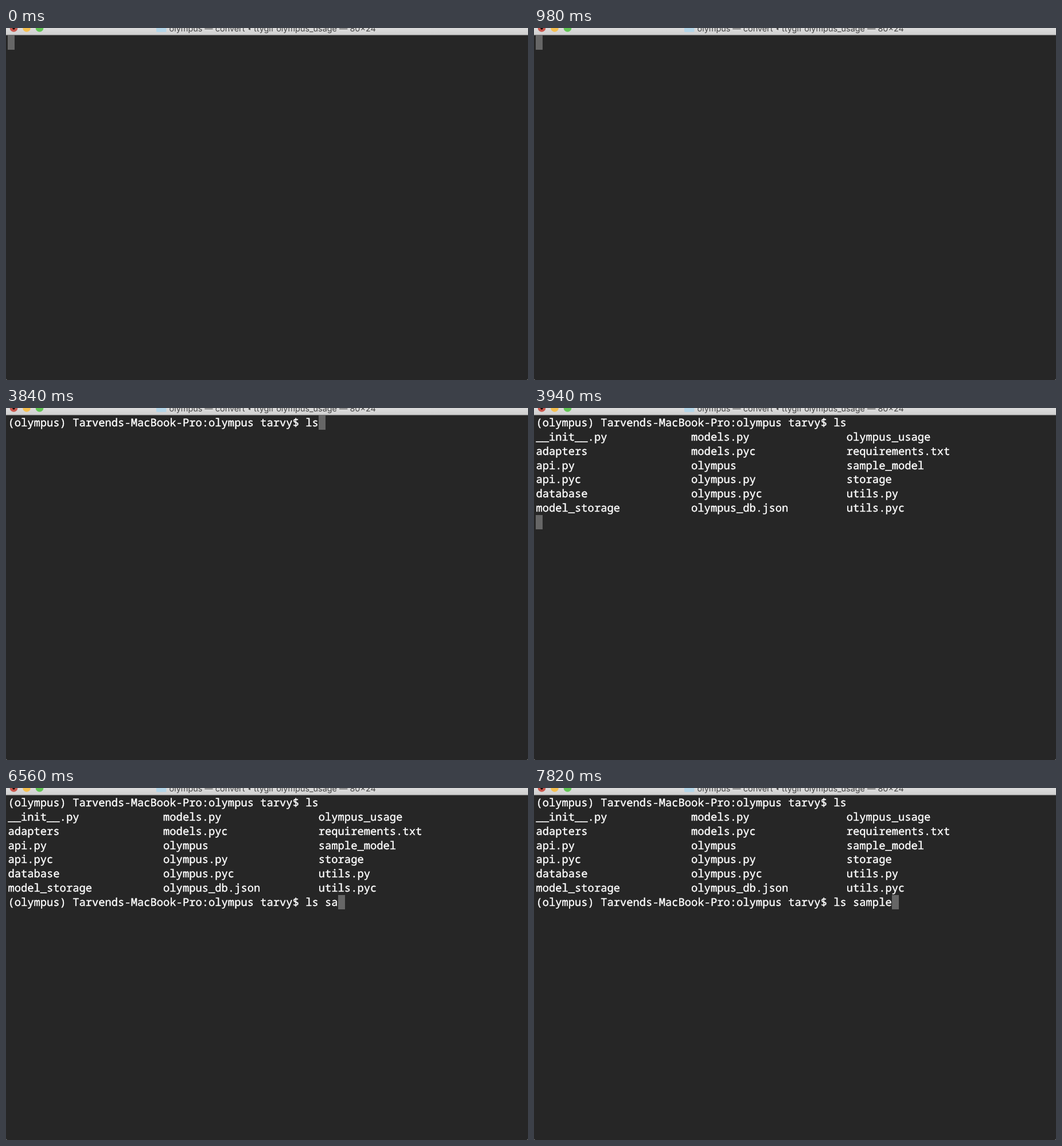
Animation, 910 px wide and 615 px high, one loop 8 s. Source, as an HTML page:

```html
<!DOCTYPE html>
<html lang="en">
<head>
<meta charset="utf-8">
<style>
html, body { margin: 0; width: 100%; height: 100%; overflow: hidden; background: #8a8a8a; }
#window { position: absolute; width: 910px; height: 615px; overflow: hidden; background: #262626; border-radius: 0 0 3px 3px; }
svg { position: absolute; left: 0; top: 0; }
svg text { font: 14.4px Inter, sans-serif; fill: #444; text-rendering: geometricPrecision; }
#screen {
  position: absolute; left: 3.4px; top: 13px; margin: 0; color: #fff;
  font: 18.81px/24.86px "Noto Sans Mono", monospace;
  -webkit-text-stroke: 0.4px #fff;
  text-rendering: geometricPrecision; font-variant-ligatures: none;
}
#cursor { position: absolute; width: 12px; height: 25px; background: #666; }
</style>
</head>
<body>
<div id="window">
  <svg width="910" height="14">
    <defs>
      <linearGradient id="bar" x2="0" y2="1">
        <stop stop-color="#dcdcdc"/><stop offset="1" stop-color="#d0d0d0"/>
      </linearGradient>
    </defs>
    <rect width="910" height="12" fill="url(#bar)"/>
    <rect y="11" width="910" height="1" fill="#c4c4c4"/>
    <rect y="12" width="910" height="1" fill="#6c6c6c"/>
    <circle cx="13.5" cy="0" r="6.8" fill="#c9574d"/>
    <circle cx="13.5" cy="0.5" r="2.2" fill="#200a08"/>
    <circle cx="36" cy="0" r="6.8" fill="#f5bf4f"/>
    <circle cx="58.5" cy="0" r="6.8" fill="#61c554"/>
    <rect x="262" y="-5" width="17.5" height="12" rx="1" fill="#b4d5e8"/>
    <text x="284.5" y="6">olympus — convert</text>
    <path d="M422 1.5l4-2.5v5z" fill="#444"/>
    <text x="432" y="6">ttygif olympus_usage — 80×24</text>
  </svg>
  <div id="cursor"></div>
  <pre id="screen"></pre>
</div>
<script>
const LOOP = 8000, CELL = 11.29, ROW = 24.86;
const PROMPT = "(olympus) Tarvends-MacBook-Pro:olympus tarvy$ ";
const CLEAR = "\f";
const listing = [
  ["__init__.py", "models.py", "olympus_usage"],
  ["adapters", "models.pyc", "requirements.txt"],
  ["api.py", "olympus", "sample_model"],
  ["api.pyc", "olympus.py", "storage"],
  ["database", "olympus.pyc", "utils.py"],
  ["model_storage", "olympus_db.json", "utils.pyc"],
].map(row => row.map(name => name.padEnd(24)).join("").trimEnd() + "\n").join("");

// [time in ms, terminal output]
const events = [
  [400, PROMPT], [470, "c"], [630, "l"], [720, "e"], [800, "a"], [890, "r"], [980, CLEAR],
  [3690, PROMPT], [3740, "l"], [3840, "s"], [3940, "\n" + listing],
  [6130, PROMPT], [6170, "l"], [6270, "s"], [6370, " "], [6460, "s"], [6560, "a"],
  [6740, "m"], [6800, "p"], [6860, "l"], [7820, "e"],
];

const screen = document.getElementById("screen");
const cursor = document.getElementById("cursor");
let shown = null;

function draw(now) {
  const t = now % LOOP;
  const output = events.filter(([at]) => at <= t).map(([, out]) => out).join("");
  const text = output.split(CLEAR).pop();
  if (text !== shown) {
    shown = text;
    screen.textContent = text;
    const lines = text.split("\n");
    cursor.style.left = Math.round(3.3 + lines.at(-1).length * CELL) + "px";
    cursor.style.top = Math.round(13 + (lines.length - 1) * ROW) + "px";
  }
  requestAnimationFrame(draw);
}
draw(performance.now());
</script>
</body>
</html>
```
